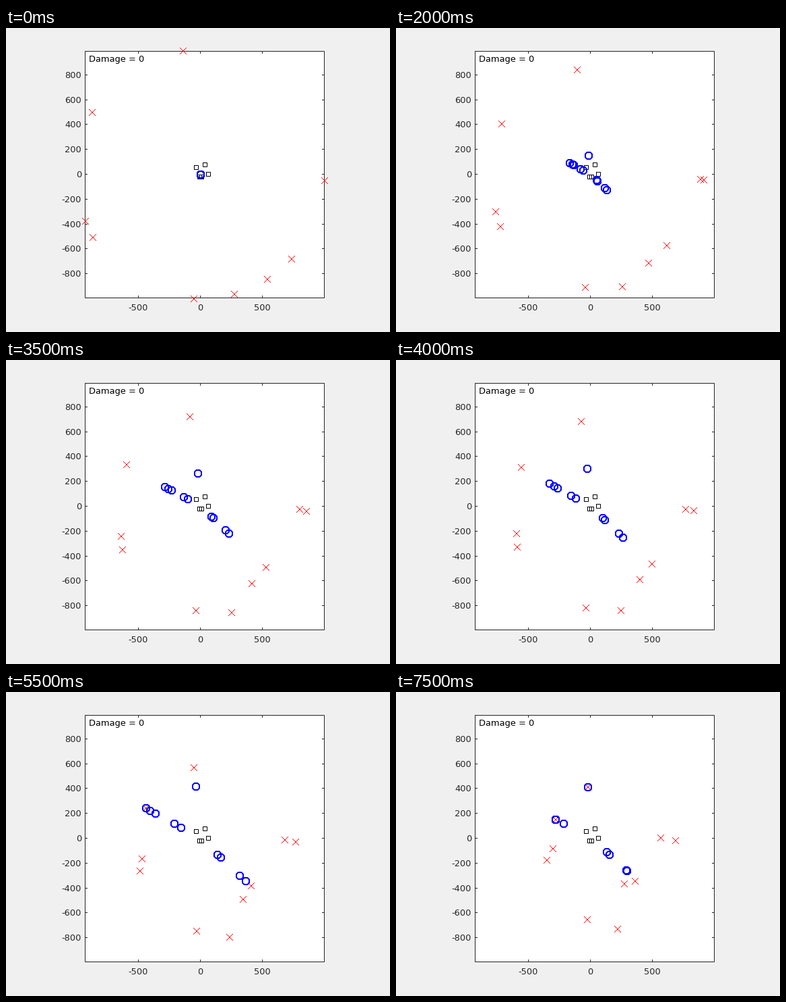
Recreate the animation shown at these times as a matplotlib script. Size 570 by 450 pixels, loop 8000 ms.

```python
import numpy as np
import matplotlib.pyplot as plt
from matplotlib.animation import FuncAnimation
from matplotlib.patches import Rectangle

W, H, DPI = 570, 450, 100
PX = 72 / DPI
FRAMES, INTERVAL = 16, 500
INK = "#262626"
LEFT, RIGHT, TOP, BOTTOM = 117.5, 472.5, 34.5, 399.5
SCALE = 0.184  # pixels per data unit

# Positions are complex pixel coordinates, y pointing down.
HOME = 288.5 + 216.5j
BASES = [282.5 + 206.5j, 295.5 + 202.5j, 300.5 + 216.5j,
         287.5 + 220.5j, 290.5 + 220.5j]
RALLY = BASES[2]
RADIUS = 184.6
AIM, KILL = 12, 12.5  # steps: predicted meeting, loss of the east raider

# Start angle in degrees, speed in pixels per step, base under attack
RAIDERS = [(97.9, 7.28, 2), (150.3, 8.39, 4), (202.2, 8.47, 1),
           (210.4, 7.51, 1), (267.1, 4.28, 1), (285.9, 2.94, 1),
           (302.7, 6.74, 2), (317.2, 7.42, 4), (356.9, 5.38, 1),
           (356.9, 3.88, 0)]
NORTH, WEST, EAST = 0, 1, 7

# Speeds of the defenders sent after each raider
SQUADS = {NORTH: [7], WEST: [8.6, 7.7, 6.9, 4, 3], EAST: [8.4, 7.3, 3.2, 3.75]}


def toward(a, b, dist):
    return a + (b - a) / abs(b - a) * dist


def raider(i, k):
    angle, speed, base = RAIDERS[i]
    start = HOME + RADIUS * np.exp(-1j * np.radians(angle))
    t = min(k, KILL) if i == EAST else k
    return toward(start, BASES[base], speed * t)


def defender(prey, speed, k):
    """Fly at the prey, stick to it once met, return after a kill."""
    t = min(k, KILL) if prey == EAST else k
    pos = toward(HOME, raider(prey, AIM), speed * t)
    target = raider(prey, t)
    if abs(pos - HOME) > abs(target - HOME):
        pos = target
    return toward(pos, RALLY, speed * (k - t))


GAP = [np.nan]
CROSS = np.array([p for i in range(-5, 5) for j in (i, -1 - i)
                  for p in (i + (j + .5) * 1j, i + 1 + (j + .5) * 1j, np.nan)])
SQUARE = np.array([-3 - 3j, 3 - 3j, 3 + 3j, -3 + 3j, -3 - 3j] + GAP)
corner = np.array([-5j, 2.4 - 5j, 5 - 2.4j])
RING = np.concatenate([corner * 1j ** q for q in range(4)] + [[-5j], GAP])


def stamp(shape, centres):
    """Repeat a shape at every centre as one broken polyline."""
    pts = (np.array(centres)[:, None] + shape).ravel()
    return pts.real, pts.imag


def snap(z):
    return np.floor(z.real + .5) + 1j * np.floor(z.imag + .5)


fig = plt.figure(figsize=(W / DPI, H / DPI), dpi=DPI, facecolor="#f0f0f0")
ax = fig.add_axes([0, 0, 1, 1])
ax.set_xlim(0, W)
ax.set_ylim(H, 0)
ax.axis("off")
ax.add_patch(Rectangle((LEFT, TOP), RIGHT - LEFT, BOTTOM - TOP,
                       fc="white", ec="none", zorder=0))


def stroke(xy, color, width=1, z=1, cap="projecting"):
    line, = ax.plot(*xy, color=color, lw=width * PX, zorder=z, snap=False,
                    solid_capstyle=cap, solid_joinstyle="miter")
    return line


def label(x, y, text, ha, color=INK):
    ax.text(x, y, text, ha=ha, va="baseline", color=color,
            family="DejaVu Sans", size=13 * PX)


stroke(([LEFT, RIGHT, RIGHT, LEFT, LEFT],
        [TOP, TOP, BOTTOM, BOTTOM, TOP]), INK)
for v in range(-500, 501, 500):
    x = np.floor(HOME.real + v * SCALE) + .5
    for edge, d in ((TOP, 3), (BOTTOM, -3)):
        stroke(([x, x], [edge, edge + d]), INK)
    label(x - .5, 418, str(v), "center")
for v in range(-800, 801, 200):
    y = np.floor(HOME.imag - v * SCALE) + .5
    for edge, d in ((LEFT, 3), (RIGHT, -3)):
        stroke(([edge, edge + d], [y, y]), INK)
    label(112, y + 4.5, str(v), "right")
label(123, 50, "Damage = 0", "left", "black")

stroke(stamp(SQUARE, BASES), "black", z=2)
crosses = stroke(([], []), "#ff0000", z=3, cap="butt")
rings = stroke(([], []), "#0000ff", 2, z=4)


def update(k):
    crosses.set_data(*stamp(CROSS, [snap(raider(i, k))
                                    for i in range(len(RAIDERS))]))
    rings.set_data(*stamp(RING, [snap(defender(prey, speed, k))
                                 for prey, squad in SQUADS.items()
                                 for speed in squad]))
    return crosses, rings


anim = FuncAnimation(fig, update, frames=FRAMES, interval=INTERVAL,
                     repeat=True, repeat_delay=0, blit=False)
plt.show()
```
